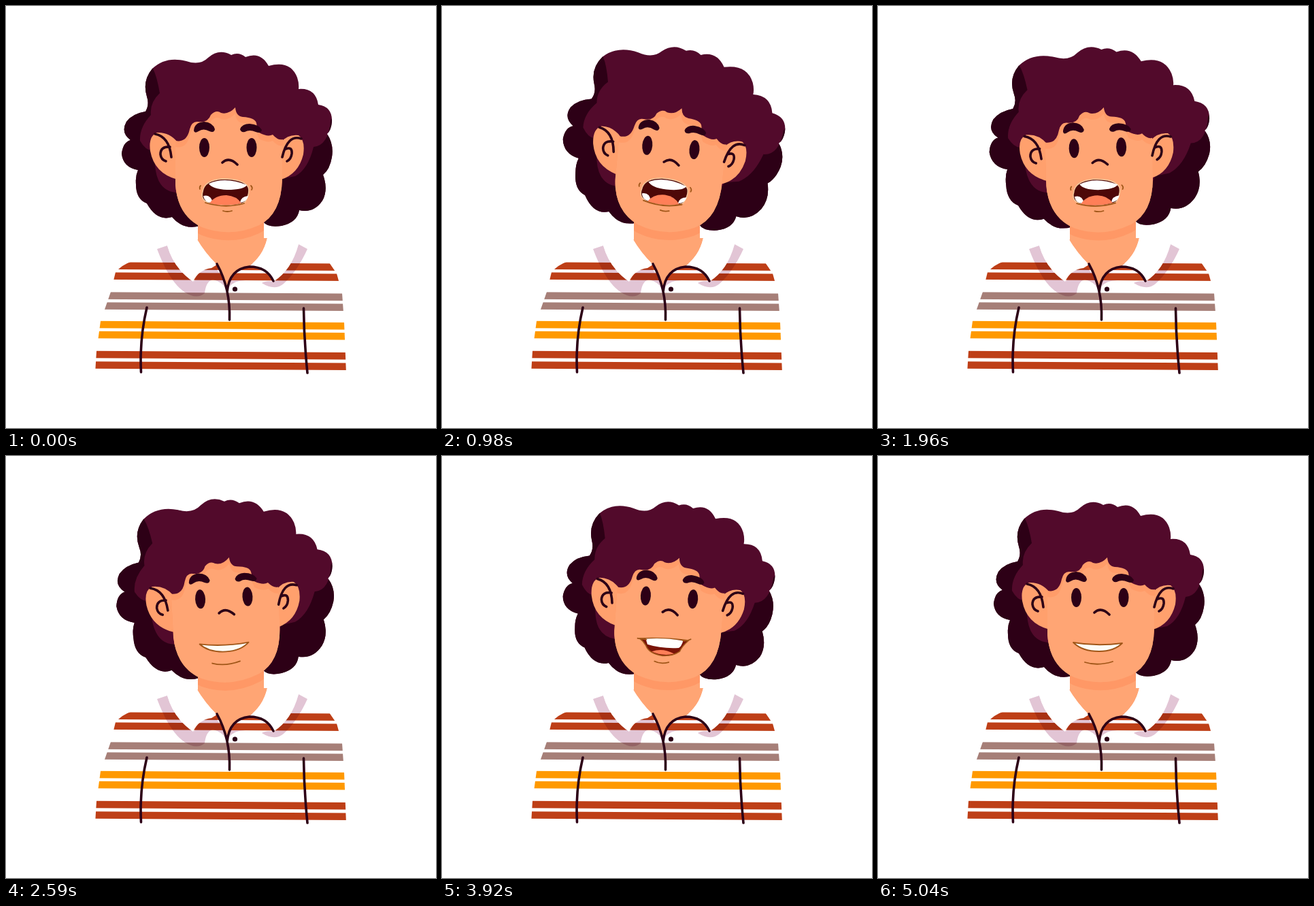
An HTML page that plays this animation: 632 by 620 pixels, repeating every 5250 ms.

```html
<!DOCTYPE html>
<html lang="en">
<head>
<meta charset="utf-8">
<title>Talking portrait</title>
<style>
  html, body { margin: 0; width: 100%; height: 100%; overflow: hidden; background: #fff; }
  svg { display: block; width: 632px; height: 620px; }
  .line { fill: none; stroke: #2d0016; stroke-width: 3.6; stroke-linecap: round; }
  .lip { fill: none; stroke: #a05618; stroke-width: 1.8; stroke-linecap: round; }
  .ink { fill: #2d0016; }
  .shadow { fill: #e2c5d5; mix-blend-mode: multiply; }
</style>
</head>
<body>
<svg viewBox="0 0 632 620">
  <defs>
    <path id="face" d="M249,198 Q266,201 270,181 Q273,169 282,170 Q297,172 301,160 Q309,152 316,157 Q327,160 337,149 Q338,162 348,163 Q366,164 368,172 Q369,180 372,186 Q385,193 392,189 Q400,198 407,196 L406,250 Q406,305 372,322 Q330,341 288,325 Q252,308 249,262 Z"/>
    <path id="neck" d="M282,305 V343 L281,344 Q292,362 310,380 L325,412 Q331,388 355,384 Q378,368 384,341 L379,341 V305 Z"/>
    <path id="torso" d="M183,370 V376 Q171,380 161,391 L154,420 L139,463 L133,507 L131,540 H500 L497,465 L494,422 L486,393 L475,377 V370 Z"/>
    <clipPath id="hairClip"><path class="outline"/></clipPath>
    <clipPath id="faceClip"><use href="#face"/></clipPath>
    <clipPath id="neckClip"><use href="#neck"/></clipPath>
    <clipPath id="torsoClip"><use href="#torso"/></clipPath>
  </defs>

  <g class="tilt">
    <path class="outline" fill="#520a2b"/>
    <g class="ink" clip-path="url(#hairClip)"><path id="darkLeft"/><path id="darkRight"/></g>
  </g>

  <use href="#neck" fill="#ffa574"/>
  <g clip-path="url(#neckClip)">
    <g class="tilt"><use href="#face" y="12" fill="#ff9866"/></g>
  </g>

  <g class="tilt">
    <path fill="#ffa06d" d="M252,200 Q240,185 222,186 Q209,191 212,213 Q218,246 252,255 Z M404,200 Q415,188 430,190 Q440,197 437,218 Q430,247 404,255 Z"/>
    <use href="#face" fill="#ff9c69"/>
    <g clip-path="url(#faceClip)"><use href="#face" y="9" fill="#ffa574"/></g>
    <path class="line" d="M219,188 Q240,192 243,222 M241,207 Q227,206 227,218 Q228,226 235,228 M434,195 Q414,188 406,222 M411,210 Q421,206 420,217 Q419,225 413,228 M318,230 Q328,221 340,233"/>
    <ellipse class="ink" cx="291.5" cy="208" rx="7.5" ry="14"/>
    <ellipse class="ink" cx="361" cy="208" rx="7.5" ry="14"/>
    <path class="ink" d="M276,183 Q277,171 291,170 Q304,171 307,181 Q306,187 299,184 Q290,179 283,184 Q277,188 276,183 Z M344,181 Q347,173 358,173 Q372,174 376,182 Q375,188 367,185 Q358,181 351,185 Q345,186 344,181 Z"/>

    <g id="open">
      <path fill="#4d0808" stroke="#f3c79b" stroke-width="1.5" d="M289,273 Q291,256 318,254 Q349,254 356,266 Q359,274 352,287 Q347,293 322,293 Q297,293 290,284 Q287,279 289,273 Z"/>
      <path fill="#fff" d="M298,261 Q322,250 354,263 Q350,270 325,270 Q303,269 298,261 Z M290,279 Q301,276 304,289 Q292,290 290,279 Z M344,289 Q345,280 356,279 Q354,288 344,289 Z"/>
      <path fill="#ff7f58" d="M299,290 Q307,278 324,278 Q339,279 346,290 Q322,295 299,290 Z"/>
      <path class="lip" d="M319,301 Q325,303 332,301 M293,289 Q322,298 350,290"/>
      <path class="lip" stroke-width="1" d="M285,269 Q284,266 286,264 M360,264 Q363,267 361,270"/>
    </g>
    <g id="smile">
      <path fill="#fdfcf6" stroke="#a05618" stroke-width="1.8" stroke-linejoin="round" d="M287,274 Q322,280 359,275 Q347,287 325,287 Q300,287 287,274 Z"/>
      <path class="lip" d="M304,303 Q323,309 345,302"/>
    </g>
    <g id="grin">
      <path fill="#7a1408" stroke="#a05618" stroke-width="1.6" stroke-linejoin="round" d="M287,271 Q324,267 359,269 Q350,278 347,286 Q337,294 322,294 Q302,292 297,281 Q293,275 287,271 Z"/>
      <path fill="#ff7f58" d="M306,289 Q322,282 339,290 Q322,295 306,289 Z"/>
      <path fill="#fff" d="M296,271 Q322,267 351,270 Q349,279 345,281 Q320,284 299,279 Z"/>
      <path class="lip" d="M284,271 L297,272 M351,270 Q358,270 362,267 M311,303 Q320,307 332,303"/>
    </g>
  </g>

  <g id="stripes" clip-path="url(#torsoClip)" stroke-width="10.6"></g>
  <use href="#neck" fill="#ffa574" clip-path="url(#collarGap)"/>
  <clipPath id="collarGap"><rect x="270" y="358" width="120" height="60"/></clipPath>
  <path class="shadow" d="M222,357 Q240,405 262,420 Q280,432 292,422 Q294,404 304,402 Q316,404 324,416 L318,398 L309,386 Q284,384 277,404 Q250,392 237,352 Z"/>
  <path class="shadow" d="M443,357 L430,350 Q415,390 394,405 Q382,403 376,407 Q395,419 408,408 Q428,390 443,357 Z M328,413 Q335,403 352,403 L330,403 Z"/>
  <path fill="#fff" d="M281,343 L237,352 Q246,385 275,405 Q283,387 302,385 L310,380 Q292,362 281,343 Z M384,341 L430,350 Q420,388 393,405 Q380,382 355,384 Q378,368 384,341 Z"/>
  <path class="line" d="M310,379 Q330,415 328.500,461 M325,420 Q328,386 358,383 Q383,383 393,404"/>
  <path class="line" d="M207,443 Q196,490 198.500,538 M437.500,444 Q438,490 443,539"/>
  <circle class="ink" cx="336.500" cy="416" r="3.6"/>
</svg>
<script>
const LOOP = 5250, STEP = 70;
const $ = s => document.querySelector(s), $$ = s => document.querySelectorAll(s);

const outline = 'M285,323 Q261,330 244,310 Q222,317 207,290 Q191,284 191,262 Q190,250 194,241 ' +
  'Q172,237 170,217 Q172,200 183,197 Q168,186 177,170 Q186,158 205,155 Q211,145 207,133 ' +
  'Q200,110 215,92 Q235,73 265,81 Q285,88 297,76 Q313,62 331,72 Q342,67 352,75 Q374,66 386,88 ' +
  'Q418,79 428,105 Q431,114 430,122 Q455,120 459,145 Q480,148 479,170 Q478,182 472,188 ' +
  'Q482,203 479,222 Q476,240 466,248 Q474,270 465,286 Q452,305 431,300 Q428,318 405,323 Q385,326 378,317 Z';
const darkLeft = 'M190,80 L216,92 Q222,104 226,128 Q211,142 213,160 Q196,178 197,198 Q205,212 214,212 ' +
  'Q218,222 220,242 Q225,272 250,274 L300,340 L150,340 L150,80 Z';
const darkRight = 'M492,145 L477,168 Q474,205 452,207 Q444,240 425,250 L405,254 L370,340 L510,340 L510,145 Z';

for (const [y, color] of [[381.5, '#be3f17'], [396.5, '#be3f17'], [425.5, '#a67f78'], [440.5, '#a67f78'],
                          [468, '#ff9900'], [483, '#ff9900'], [512, '#be3f17'], [527.5, '#be3f17']])
  $('#stripes').innerHTML += `<path stroke="${color}" d="M125,${y} L505,${y + 2.3}"/>`;

const clamp = v => Math.max(0, Math.min(1, v));
const ease = v => (1 - Math.cos(Math.PI * clamp(v))) / 2;

// Eased value through [time, value] keys
function track(keys, t) {
  let v = keys[0][1];
  for (let i = 1; i < keys.length; i++) {
    const [t0, v0] = keys[i - 1], [t1, v1] = keys[i];
    v += (v1 - v0) * ease((t - t0) / (t1 - t0));
  }
  return v;
}

// Swells the crown of the hair; the ends near the neck stay put
const swell = (d, amount) => d.replace(/(\d+),(\d+)/g, (_, a, b) => {
  const x = +a, y = +b, k = amount * clamp((300 - y) / 90);
  return `${x + k * (x - 235) * 0.052},${y - k * 8 * clamp((480 - x) / 150)}`;
});

const tiltKeys = [[0, 0], [1010, 5.2], [2350, -3.4], [4150, 4.3], [5040, 0]];
const swellKeys = [[0, 0], [1150, 1], [2100, 1], [3430, 0]];

function draw(now) {
  const t = Math.min(5040, Math.floor(now % LOOP / STEP) * STEP);
  const angle = track(tiltKeys, t), amount = track(swellKeys, t);
  $$('.tilt').forEach(g => g.setAttribute('transform', `rotate(${angle} 332 320)`));
  $$('.outline').forEach(p => p.setAttribute('d', swell(outline, amount)));
  $('#darkLeft').setAttribute('d', swell(darkLeft, amount));
  $('#darkRight').setAttribute('d', swell(darkRight, amount));
  const mouth = t < 2030 ? 'open' : t < 2980 || t >= 4480 ? 'smile' : 'grin';
  for (const id of ['open', 'smile', 'grin'])
    $('#' + id).setAttribute('display', id === mouth ? 'inline' : 'none');
}

const start = performance.now();
(function tick() {
  draw(performance.now() - start);
  requestAnimationFrame(tick);
})();
</script>
</body>
</html>
```
